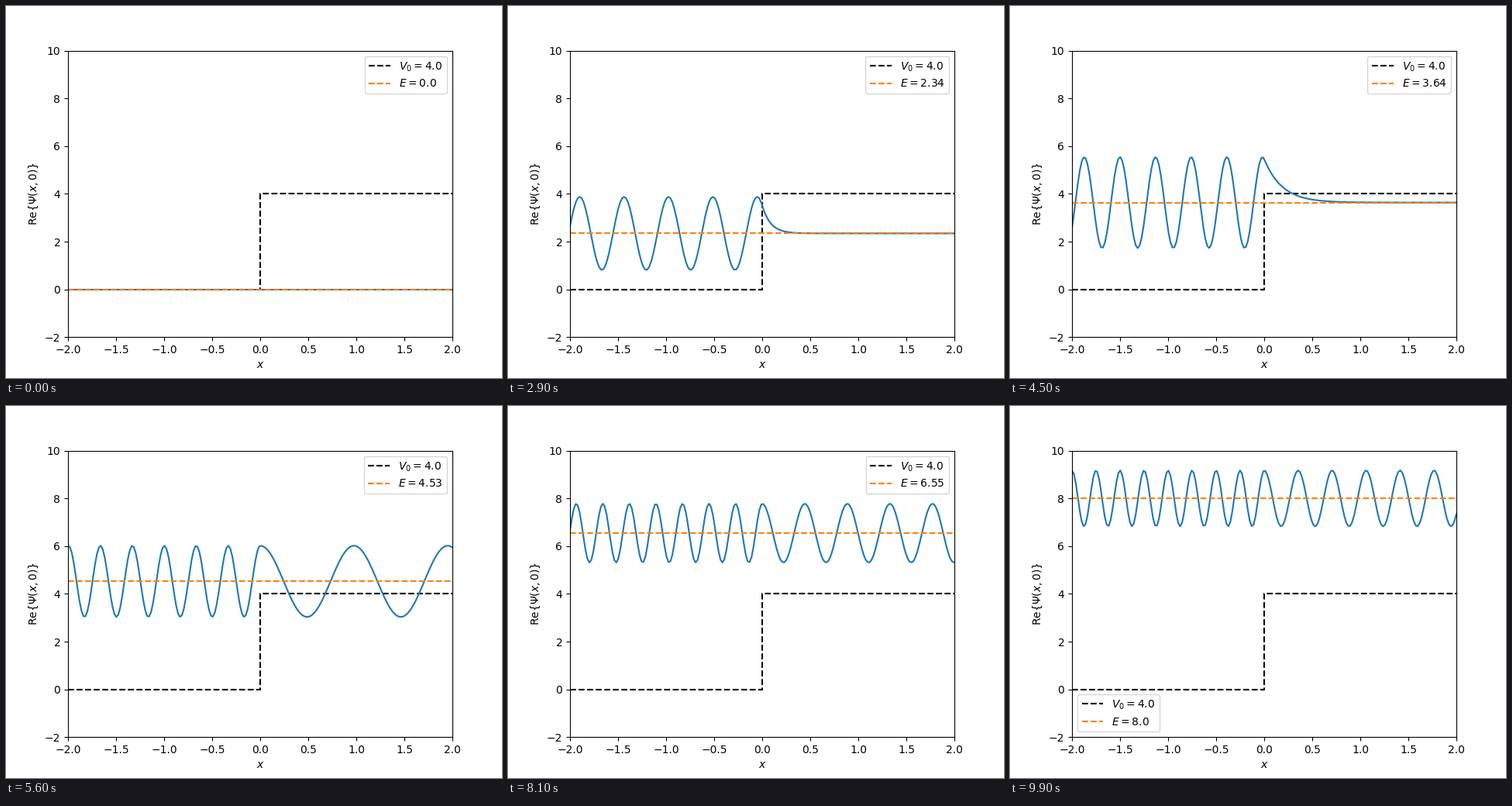
These frames come from a looping animation (640x480 px, 10 s). A matplotlib script:

```python
import matplotlib.pyplot as plt
import numpy as np
from matplotlib.animation import FuncAnimation

FRAMES = 100
V0 = 4.0
HBAR = 1 / (2 * np.pi)
MASS = 1.0

energies = np.linspace(0, 2 * V0, FRAMES)
x = np.linspace(-2, 2, 200)


def wave(energy):
    """Real part of the stationary state scattered by the step."""
    k1 = np.sqrt(2 * MASS * energy) / HBAR
    k2 = np.sqrt(2 * MASS * (energy - V0) + 0j) / HBAR
    refl = (k1 - k2) / (k1 + k2)
    trans = 2 * k1 / (k1 + k2)
    left = np.exp(1j * k1 * x) + refl * np.exp(-1j * k1 * x)
    right = trans * np.exp(1j * k2 * np.maximum(x, 0))
    return np.where(x < 0, left, right).real


def energy_label(energy):
    return f"$E = {round(float(energy), 2)}$"


fig, ax = plt.subplots(figsize=(6.4, 4.8), dpi=100)
ax.set(xlim=(-2, 2), ylim=(-2, 10), xlabel="$x$",
       ylabel=r"$\mathrm{Re}\{\Psi(x, 0)\}$")

ax.plot([-2, 0, 0, 2], [0, 0, V0, V0], "k--", label=f"$V_0 = {V0}$")
psi_line, = ax.plot(x, wave(0), color="C0")
e_line, = ax.plot([-2, 2], [0, 0], "--", color="C1", label=energy_label(0))
legend = ax.legend(loc="best")


def update(i):
    energy = energies[i]
    psi_line.set_ydata(wave(energy) + energy)
    e_line.set_ydata([energy, energy])
    legend.get_texts()[1].set_text(energy_label(energy))
    return psi_line, e_line, legend


anim = FuncAnimation(fig, update, frames=FRAMES, interval=100,
                     repeat=True, repeat_delay=0, blit=False)
plt.show()
```
